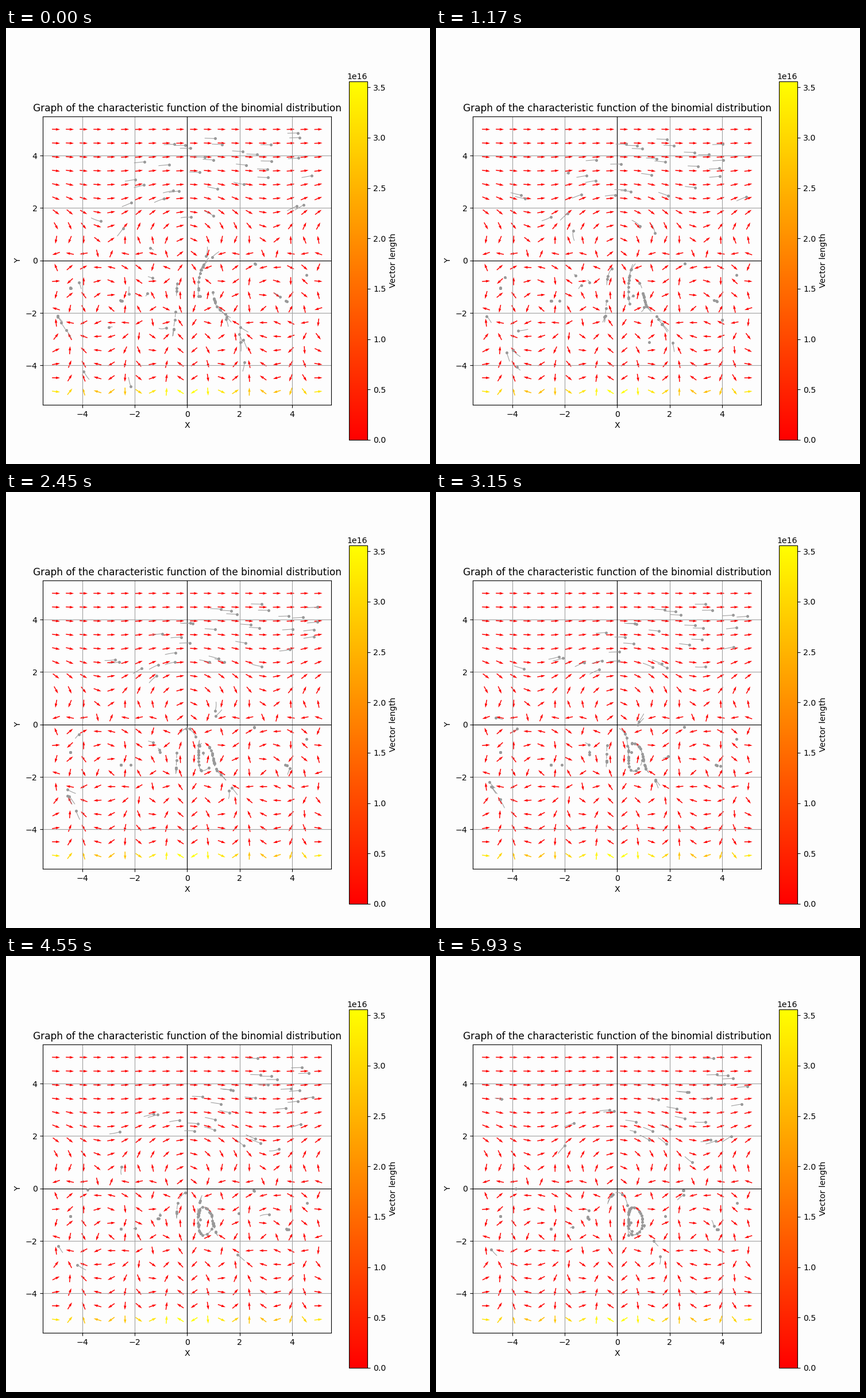
A matplotlib script for the animation above (5.95 s loop, 738 by 759 pixels).

```python
import numpy as np
import matplotlib.pyplot as plt
from matplotlib.animation import FuncAnimation
from matplotlib.collections import LineCollection

W, H, DPI = 738, 759, 100
FRAMES, INTERVAL = 170, 35
GRID, LIMIT = 20, 5.0
COUNT, STEP, TAIL = 100, 1 / 30, 12
WARM_UP, STEPS = 90, 129
GREY, PAPER = "#999999", "#fdfdfd"


def char_fn(z, n=10, p=0.3):
    """Characteristic function of the binomial distribution."""
    return (1 - p + p * np.exp(1j * z)) ** n


axis = np.linspace(-LIMIT, LIMIT, GRID)
gx, gy = np.meshgrid(axis, axis)
field = np.conj(char_fn(gx + 1j * gy))
length = np.abs(field)
unit = field / length


def flow(pos):
    """Bilinear interpolation of the unit field."""
    g = (pos + LIMIT) * (GRID - 1) / (2 * LIMIT)
    cell = np.clip(g.astype(int), 0, GRID - 2)
    (i, j), (fx, fy) = cell.T, (g - cell).T
    low = unit[j, i] * (1 - fx) + unit[j, i + 1] * fx
    high = unit[j + 1, i] * (1 - fx) + unit[j + 1, i + 1] * fx
    v = low * (1 - fy) + high * fy
    return np.column_stack([v.real, v.imag])


def trace(seed=7):
    """Positions and birth steps; a particle leaving the grid is reborn."""
    rng = np.random.default_rng(seed)
    total = WARM_UP + STEPS + 1
    pos = np.empty((total, COUNT, 2))
    born = np.zeros((total, COUNT), int)
    pos[0] = rng.uniform(-LIMIT, LIMIT, (COUNT, 2))
    for k in range(1, total):
        new = pos[k - 1] + STEP * flow(pos[k - 1])
        out = (np.abs(new) > LIMIT).any(axis=1)
        new[out] = rng.uniform(-LIMIT, LIMIT, (out.sum(), 2))
        pos[k], born[k] = new, np.where(out, k, born[k - 1])
    return pos, born


pos, born = trace()


def box(left, top, right, bottom):
    return [left / W, 1 - bottom / H, (right - left) / W, (bottom - top) / H]


plt.rcParams["font.size"] = 10.17
fig = plt.figure(figsize=(W / DPI, H / DPI), dpi=DPI, facecolor=PAPER)
ax = fig.add_axes(box(64.3, 153.6, 566.45, 655.8), facecolor=PAPER)
ax.set(xlim=(-5.5, 5.5), ylim=(-5.5, 5.5), xlabel="X", ylabel="Y",
       xticks=range(-4, 5, 2), yticks=range(-4, 5, 2))
ax.set_title("Graph of the characteristic function of the binomial distribution")
ax.grid(color="#a0a0a0", lw=0.8)
ax.axhline(0, color="black", lw=0.8)
ax.axvline(0, color="black", lw=0.8)

arrows = ax.quiver(gx, gy, unit.real, unit.imag, length, cmap="autumn",
                   pivot="mid", scale=36, width=0.003)
bar = fig.colorbar(arrows, cax=fig.add_axes(box(597.3, 92.8, 629.3, 716.8)))
bar.set_label("Vector length")

trails = ax.add_collection(LineCollection([], colors=GREY, linewidths=0.75, zorder=2),
                           autolim=False)
dots, = ax.plot([], [], "o", color=GREY, ms=3.6, mew=0, zorder=3)


def update(frame):
    k = WARM_UP + round(frame * STEPS / (FRAMES - 1))
    starts = np.maximum(born[k], k - TAIL)
    trails.set_segments([pos[s:k + 1, i] for i, s in enumerate(starts)])
    dots.set_data(*pos[k].T)
    return trails, dots


anim = FuncAnimation(fig, update, frames=FRAMES, interval=INTERVAL,
                     init_func=lambda: update(0), repeat=True, repeat_delay=0)
plt.show()
```
